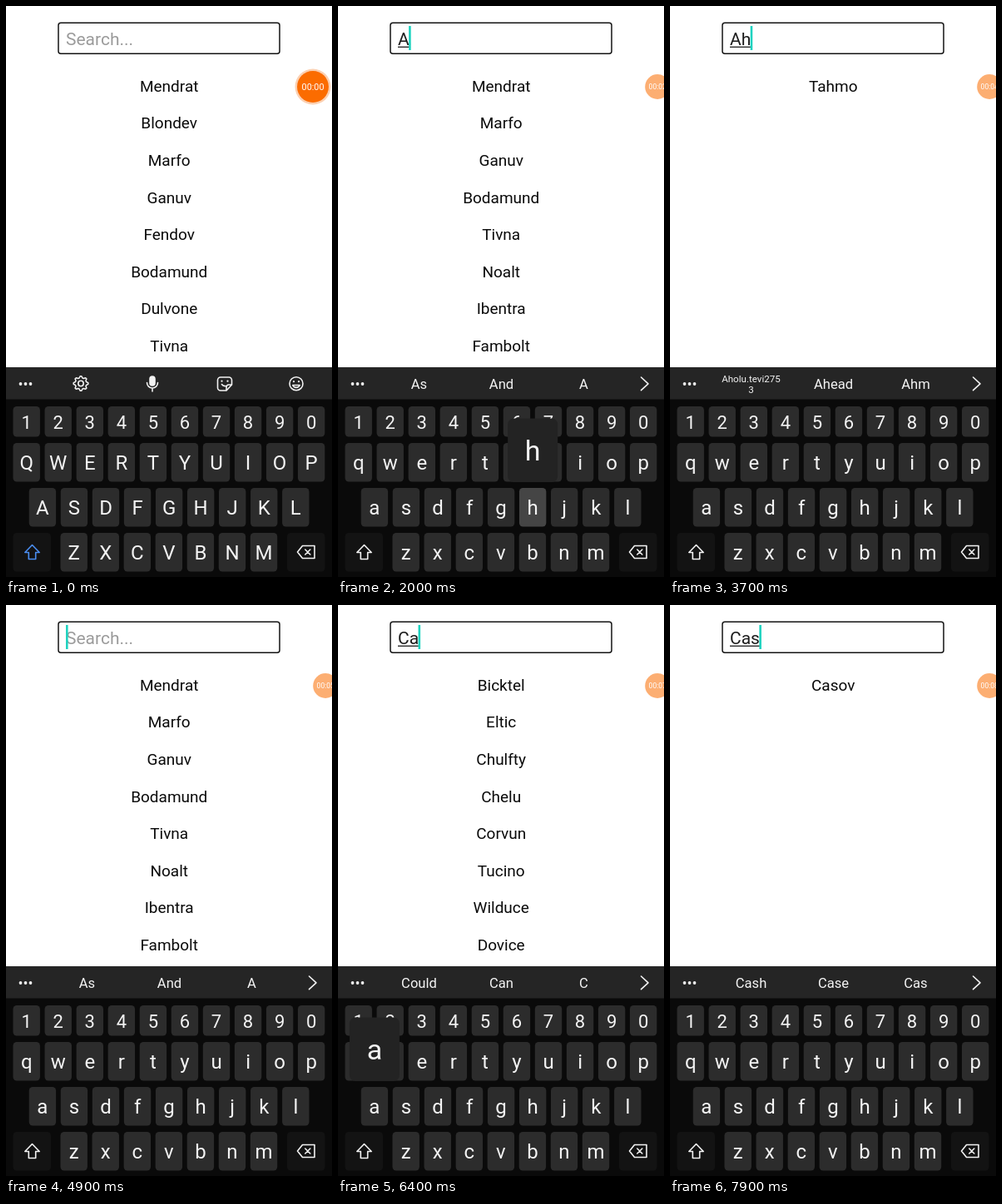
Animation of 392 by 686 pixels, one loop 8 s. Source, as an HTML page:

```html
<!DOCTYPE html>
<html lang="en">
<head>
<meta charset="utf-8">
<title>Name search</title>
<style>
  html, body { margin: 0; width: 100%; height: 100%; overflow: hidden; background: #fff; }
  svg { display: block; width: 392px; height: 686px; font-family: Roboto, sans-serif; }
  .mid { text-anchor: middle; }
  #list { font-size: 19px; fill: #0a0a0a; }
  #typed, #hint { font-size: 21px; }
  #keys, #sugg, #popup { fill: #f4f4f4; }
  #sugg { font-size: 16.6px; }
  #sugg .small { font-size: 11.6px; }
  .line { fill: none; stroke: #f2f2f2; stroke-width: 1.6; stroke-linejoin: round; stroke-linecap: round; }
</style>
</head>
<body>
<svg viewBox="0 0 392 686">
  <rect width="392" height="686" fill="#fff"/>

  <rect x="63" y="20.2" width="266" height="37" rx="3" fill="#fff" stroke="#141414" stroke-width="1.5"/>
  <text id="hint" x="72" y="47" fill="#9b9b9b">Search...</text>
  <text id="typed" x="72" y="47" fill="#1c1c1c"></text>
  <rect id="under" x="72" y="48.6" height="1.4" fill="#2a2a2a"/>
  <rect id="caret" y="24" width="2.6" height="29" fill="#1fd3c0"/>

  <g id="list" class="mid"></g>

  <g id="bubble">
    <circle id="ring" r="21.5" fill="#fbd0b2"/>
    <circle r="19" fill="#fb6c00"/>
    <text id="clock" class="mid" y="3.8" font-size="10.8" fill="#fff"></text>
  </g>

  <rect y="434" width="392" height="252" fill="#0a0a0a"/>
  <rect y="434" width="392" height="38.5" fill="#252525"/>
  <g fill="#f2f2f2">
    <circle cx="17.5" cy="454" r="1.9"/><circle cx="23.5" cy="454" r="1.9"/><circle cx="29.5" cy="454" r="1.9"/>
  </g>

  <g id="tools" class="line">
    <g transform="translate(90 453.5)">
      <path id="gear"/>
      <circle r="3.2"/>
    </g>
    <rect x="173" y="445" width="6" height="11" rx="3" fill="#f2f2f2"/>
    <path d="M169.5 452.5a6.5 6.5 0 0 0 13 0M176 459.500v3.500"/>
    <path d="M258 446h10a3.500 3.500 0 0 1 3.500 3.500v5.500l-6.500 7h-7a3.500 3.500 0 0 1-3.500-3.500v-9a3.500 3.500 0 0 1 3.500-3.500ZM271 455h-3a3 3 0 0 0-3 3v3.500M259.500 454.500q1.500 2.500 4.500 2"/>
    <path d="M259.500 450.500v.2M266.500 450.500v.2" stroke-width="2.200"/>
    <circle cx="349" cy="453.700" r="8"/>
    <path d="M344.800 455.500a4.500 4.500 0 0 0 8.400 0Z"/>
    <path d="M346 451v.2M352 451v.2" stroke-width="2.200"/>
  </g>
  <g id="words">
    <g id="sugg" class="mid"></g>
    <path class="line" d="M364.500 446l8.500 7.800-8.500 7.800"/>
  </g>

  <g id="keys" class="mid"></g>
  <path id="shift" class="line" d="M31.500 647.500l8.700 9h-4.500v8h-8.400v-8h-4.500Z"/>
  <path class="line" d="M356.500 648.500h14.500v15h-14.500l-6-7.500ZM359.800 653l6 6M365.800 653l-6 6"/>

  <g id="popup">
    <rect y="495.500" width="60" height="76.500" rx="7" fill="#232323"/>
    <text class="mid" x="30" y="546" font-size="34"></text>
  </g>
</svg>

<script>
const LOOP = 8000, PITCH = 38.05;
const $ = id => document.getElementById(id);

const pool = ("Mendrat Blondev Marfo Ganuv Fendov Bodamund Dulvone Tivna Noalt Ibentra Fambolt " +
  "Tahmo Bahlundov Lahni Vahdret Gahvi Nahlom Jahru Fahnod " +
  "Bicktel Eltic Chulfty Chelu Corvun Tucino Wilduce Dovice " +
  "Ducalo Vecarn Bicavel Locadu Mucavi Tecarol Hocanel Casov").split(" ");

// Each track holds [start ms, value] steps
const typed = [[0, ""], [1100, "A"], [2100, "Ah"], [2800, "Ahm"], [3200, "Ah"], [4300, "A"],
  [4600, ""], [5700, "C"], [6300, "Ca"], [7400, "Cas"]];
const query = [[0, ""], [1600, "a"], [2500, "ah"], [3000, "ahm"], [4000, "ah"], [4600, "a"],
  [5100, ""], [6100, "c"], [6900, "ca"], [7500, "cas"]];
const words = [[0, null], [1500, "As,And,A"], [2500, "Aholu.tevi275|3,Ahead,Ahm"], [3000, "Ahm,Ahead,Ah"],
  [3300, "Aholu.tevi275|3,Ahead,Ahm"], [4400, ",,"], [4900, "As,And,A"], [5200, null],
  [6000, "Could,Can,C"], [6900, "Can,Call,Ca"], [7700, "Cash,Case,Cas"]];
const upper = [[0, true], [1300, false], [5200, true], [5800, false]];
const popup = [[0, ""], [900, "a"], [1200, ""], [2000, "h"], [2200, ""], [2700, "m"], [2900, ""],
  [5600, "c"], [5800, ""], [6200, "a"], [6500, ""], [7300, "s"], [7500, ""]];
const pressed = [[0, ""], [900, "a"], [1200, ""], [2000, "h"], [2200, ""], [2700, "m"], [2900, ""],
  [3400, "del"], [3600, ""], [4200, "del"], [4900, ""],
  [5600, "c"], [5800, ""], [6200, "a"], [6400, ""], [7300, "s"], [7500, ""]];
const caretOn = [[0, false], [100, true], [500, false], [900, true], [3300, false], [3400, true],
  [6800, false], [7100, true]];

const at = (track, t) => track.findLast(step => step[0] <= t)[1];

function add(parent, tag, attrs, text = "") {
  const el = document.createElementNS("http://www.w3.org/2000/svg", tag);
  for (const k in attrs) el.setAttribute(k, attrs[k]);
  el.textContent = text;
  return parent.appendChild(el);
}

const keys = {};
function key(name, x, y, w, h, fill) {
  keys[name] = { fill, mid: x + w / 2, rect: add($("keys"), "rect", { x, y, width: w, height: h, rx: 4.5 }) };
}
function keyRow(chars, x, y, h, base, size) {
  [...chars].forEach((c, i) => {
    const mid = x + i * PITCH;
    key(c, mid - 16.2, y, 32.4, h, "#2c2c2c");
    keys[c].label = add($("keys"), "text", { x: mid, y: base, "font-size": size }, c);
  });
}
keyRow("1234567890", 24.7, 481, 36.5, 508, 22);
keyRow("qwertyuiop", 24.7, 525, 46.5, 556.7, 24);
keyRow("asdfghjkl", 43.9, 579, 46.5, 610.5, 24);
keyRow("zxcvbnm", 81.7, 633, 46.5, 664.5, 24);
key("shift", 8.5, 633, 45.5, 46.5, "#131313");
key("del", 338, 633, 45.5, 46.5, "#131313");

const rows = Array.from({ length: 8 }, (_, i) => add($("list"), "text", { x: 196.2, y: 102.6 + i * 44.64 }));

// Eight-toothed cog outline
const cog = Array.from({ length: 32 }, (_, i) => {
  const a = (i - 0.5) * Math.PI / 16, r = i % 4 < 2 ? 8.8 : 6.8;
  return (r * Math.sin(a)).toFixed(2) + " " + (-r * Math.cos(a)).toFixed(2);
});
$("gear").setAttribute("d", "M" + cog.join("L") + "Z");

function showWords(text) {
  const box = $("sugg");
  if (box.dataset.text === text) return;
  box.dataset.text = text;
  box.replaceChildren();
  text.split(",").forEach((word, i) => {
    const x = 97.5 + i * 99, parts = word.split("|");
    if (parts.length === 1) add(box, "text", { x, y: 459.6 }, word);
    else parts.forEach((p, j) => add(box, "text", { x, y: 451.6 + j * 13, class: "small" }, p));
  });
}

function show(el, on) { el.style.display = on ? "" : "none"; }

function render(t) {
  const text = at(typed, t), q = at(query, t), caps = at(upper, t);
  const sugg = at(words, t), pop = at(popup, t), down = at(pressed, t);

  $("typed").textContent = text;
  const width = text ? $("typed").getComputedTextLength() : 0;
  $("under").setAttribute("width", width);
  $("caret").setAttribute("x", 72 + Math.max(0, width - 0.6));
  show($("caret"), at(caretOn, t));
  show($("hint"), !text);

  const hits = pool.filter(name => name.toLowerCase().includes(q));
  rows.forEach((row, i) => row.textContent = hits[i] || "");

  show($("tools"), sugg === null);
  show($("words"), sugg !== null);
  if (sugg !== null) showWords(sugg);

  for (const name in keys) {
    const k = keys[name];
    k.rect.setAttribute("fill", name === down ? "#454545" : k.fill);
    if (k.label) k.label.textContent = caps ? name.toUpperCase() : name;
  }
  $("shift").style.stroke = caps ? "#4a8df0" : "#f2f2f2";

  show($("popup"), pop);
  if (pop) {
    $("popup").setAttribute("transform", `translate(${keys[pop].mid - 30} 0)`);
    $("popup").lastElementChild.textContent = caps ? pop.toUpperCase() : pop;
  }

  // The recorder bubble docks at the right edge
  const dock = Math.min(1, Math.max(0, (t - 250) / 350));
  $("bubble").setAttribute("transform", `translate(${369 + 15.2 * dock} 97) scale(${1 - 0.21 * dock})`);
  $("bubble").setAttribute("opacity", 1 - 0.45 * dock);
  $("ring").setAttribute("opacity", 1 - dock);
  $("clock").textContent = "00:0" + Math.floor((t + 600) / 1000);
}

let start;
function tick(now) {
  start ??= now;
  render((now - start) % LOOP);
  requestAnimationFrame(tick);
}
render(0);
requestAnimationFrame(tick);
</script>
</body>
</html>
```
